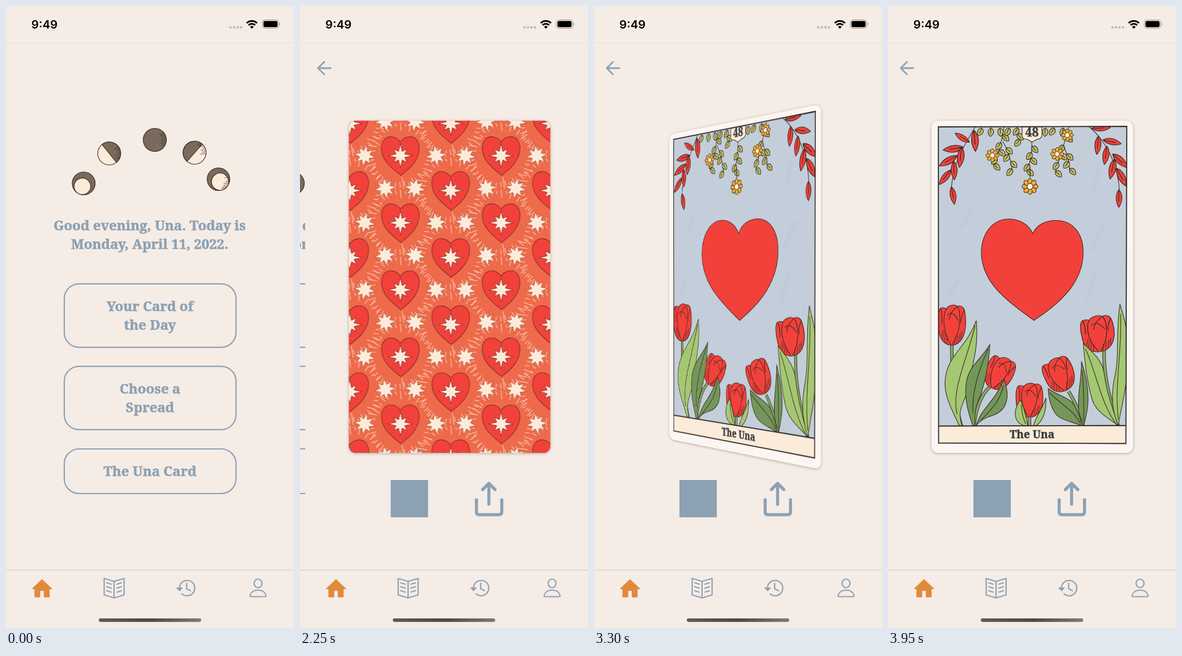
Animation of 509x1101 px, one loop 4000 ms. Source, as an HTML page:

```html
<!DOCTYPE html>
<html lang="en">
<head>
<meta charset="utf-8">
<title>Card of the day</title>
<style>
  html, body { margin: 0; width: 100%; height: 100%; overflow: hidden; background: #f5ece6; }
  #stage { position: relative; width: 509px; height: 1101px; overflow: hidden; background: #f5ece6; }
  .layer { position: absolute; left: 0; top: 0; width: 509px; height: 1101px; }
  #detail { background: #f5ece6; }
  svg { display: block; }
  .face { position: absolute; left: 77px; top: 203px; width: 356px; height: 588px;
    border-radius: 12px; overflow: hidden; box-shadow: 0 1px 5px rgba(60, 40, 30, .35); }
  #back { background: #ee6a4a; }
  #front { background: #fcf6f2; }
  text { text-anchor: middle; font-family: "Noto Serif", serif; font-weight: 700; }
  .copy { font-size: 24px; fill: #8ca1b3; stroke: #8ca1b3; stroke-width: .6; }
  .label { fill: #3b3c3e; stroke: #3b3c3e; stroke-width: .5; }
  .line { fill: none; stroke: #8ca1b3; stroke-width: 2.2; stroke-linecap: round; stroke-linejoin: round; }
  .ink { stroke: #3a2a22; stroke-width: 1.1; stroke-linejoin: round; stroke-linecap: round; }
  .dark { fill: #786b5b; }
  .cream { fill: #fdebda; }
  .red { fill: #f2413b; }
  .lime { fill: #a4c872; }
  .green { fill: #73975a; }
  .none { fill: none; }
</style>
</head>
<body>
<div id="stage">
  <svg id="home" class="layer" viewBox="0 0 509 1101">
    <g class="ink">
      <circle class="dark" cx="137.3" cy="314" r="20.3"/>
      <circle class="cream" cx="135" cy="319.2" r="14.6"/>
      <circle class="cream" cx="182.4" cy="261" r="20.3"/>
      <path class="dark" d="M169.6 245.2A20.3 20.3 0 0 1 195.2 276.8Z"/>
      <circle class="dark" cx="263" cy="237" r="20.5"/>
      <circle class="cream" cx="333.3" cy="259.6" r="20.4"/>
      <path class="dark" d="M347 244.4A20.4 20.4 0 0 0 320 275.2Z"/>
      <circle class="dark" cx="375.5" cy="306.6" r="20"/>
      <circle class="cream" cx="378.4" cy="311" r="15.2"/>
      <path id="hatch" class="none" stroke-width=".8"/>
    </g>
    <g class="copy">
      <text x="254" y="397">Good evening, Una. Today is</text>
      <text x="254" y="430">Monday, April 11, 2022.</text>
      <text x="254.5" y="540">Your Card of</text>
      <text x="254.5" y="573">the Day</text>
      <text x="254.5" y="686">Choose a</text>
      <text x="254.5" y="719">Spread</text>
    </g>
    <g class="line">
      <rect x="103" y="491.8" width="303.5" height="112.4" rx="26"/>
      <rect x="103" y="637.8" width="303.5" height="112" rx="26"/>
    </g>
    <g id="pressed">
      <rect class="line" x="103" y="784" width="303.5" height="79" rx="26"/>
      <text class="copy" x="254.5" y="832">The Una Card</text>
    </g>
  </svg>

  <div id="detail" class="layer">
    <svg class="layer" viewBox="0 0 509 1101">
      <path class="line" style="stroke-width:2.8" d="M45 110H23M33.5 99L22.5 110L33.5 121"/>
      <rect x="151" y="839" width="66" height="66" fill="#8ca1b3"/>
      <path class="line" style="stroke-width:5.4" d="M302.5 874V895.5Q302.5 900.5 307.5 900.5H342Q347.3 900.5 347.3 895.5V874M324.5 882V846M313.5 856L324.5 845L335.5 856"/>
    </svg>
    <div id="back" class="face"><svg width="356" height="588"><defs id="motifs"></defs><g id="pattern"></g></svg></div>
    <div id="front" class="face">
      <svg width="356" height="588" viewBox="77 203 356 588">
        <defs>
          <g id="tulip" class="ink">
            <path class="red" d="M-3 35C-17 34-24 18-24 0C-25-14-24-26-20-30C-16-32-13-31-10-29C-6-36 5-38 10-33C14-36 20-33 22-27C26-12 25 10 19 22C14 32 6 36-3 35Z"/>
            <path class="none" d="M-10-29C-18-12-14 14-3 33M10-33C2-27-4-20-5-10M10-33C17-20 15 12 1 33M-8-18C0-26 6-18 11-8M22-27C18-20 15-12 16-4M-20-30C-16-22-18-12-18-2"/>
            <path class="none" stroke-width=".8" d="M-19 20l4-13M-17 25l4-14M-14 29l3-13M-10 32l2-13M16 24l2-13M12 29l3-15M8 32l3-14M4 34l2-13"/>
          </g>
          <path id="leaf" d="M0 0C8-7 19-7 30 0C20 6 8 6 0 0M0 0L20 0"/>
          <path id="bud" d="M0 0C3-7 10-7 15 0C10 6 3 6 0 0M0 0L10 0"/>
          <g id="flower" class="ink"></g>
          <clipPath id="sky"><rect x="89" y="214" width="332" height="529"/></clipPath>
        </defs>
        <rect x="89" y="214" width="332" height="560" fill="#c3ceda"/>
        <g fill="none" stroke="#b9c5ce" stroke-width="9" stroke-linecap="round" opacity=".4">
          <path d="M109 510L124 485M372 290L364 322M366 475L352 520M380 390L360 430M130 390L145 365"/>
        </g>
        <g clip-path="url(#sky)">
          <g id="vines" class="ink"></g>
          <g class="ink">
            <path class="none" d="M154 214C140 240 116 270 112 322M356 214C386 240 407 280 409 328"/>
            <g id="sprigs" class="red"></g>
          </g>
          <path class="ink red" d="M256 403C248 385 230 377 214 377C184 377 165 404 165 437C166 488 206 520 258 556.5C303 527 345 490 345 436C345 402 326 379 296 379.5C277 380 262 388 256 403Z"/>
          <g fill="none" stroke="#3a2a22" stroke-width="6"><path id="stems" d="M113 598C112 650 118 705 130 744M180 674C162 690 154 720 152 744M250 726V744M319 682C330 700 340 720 343 744M382 610C380 660 398 715 407 744"/></g>
          <use href="#stems" fill="none" stroke="#86aa62" stroke-width="4"/>
          <use href="#tulip" transform="translate(113 565)"/>
          <use href="#tulip" transform="translate(196.5 650) rotate(24) scale(1 .84)"/>
          <g class="ink">
            <path class="lime" d="M126 743C112 712 99 690 101 663C104 618 138 606 156 557C161 608 147 640 142 672C137 705 120 710 131 743Z"/>
            <path class="green" d="M150 743C140 715 134 690 139 663C145 635 165 625 180 599C178 640 170 668 164 688C156 705 152 720 154 743Z"/>
            <path class="green" d="M156 743C164 712 188 702 205 661C214 685 212 705 200 716C188 728 168 725 156 743Z"/>
            <path class="none" d="M122 722C112 680 138 630 154 566M150 720C148 680 162 640 177 607M163 735C180 715 196 705 204 672"/>
          </g>
          <use href="#tulip" transform="translate(250 698) scale(.98 .85)"/>
          <use href="#tulip" transform="translate(303 653) rotate(-22) scale(1.08 .85)"/>
          <use href="#tulip" transform="translate(371 580.5) rotate(-8) scale(1.2 .9)"/>
          <g class="ink">
            <path class="lime" d="M241 743C221 737 221 715 234 697C240 710 244 725 247 743Z"/>
            <path class="lime" d="M257 743C262 725 272 715 279 694C280 715 276 732 262 743Z"/>
            <path class="green" d="M283 677C300 690 324 693 331 710C337 722 341 730 342 743C325 735 305 735 295 720C287 708 284 695 283 677Z"/>
            <path class="green" d="M342 629C352 660 356 690 352 715C350 728 348 735 346 743C343 735 338 725 337 715C334 690 342 665 342 629Z"/>
            <path class="lime" d="M345 597C360 612 378 625 382 650C386 680 395 710 408 743C390 730 370 720 362 700C352 670 348 630 345 597Z"/>
            <path class="lime" d="M410 528C416 550 423 565 422 595V655C419 690 411 715 407 743C396 715 394 690 400 660C410 620 402 580 410 528Z"/>
            <path class="none" d="M286 685C305 705 328 715 339 738M343 645C347 680 346 710 346 735M349 607C367 645 375 700 402 738M411 545C414 610 400 670 407 732M236 706C236 720 239 730 243 739"/>
          </g>
        </g>
        <path class="ink cream" d="M237 214H272V230Q270 236 263 236L254.5 241L246 236Q238 236 237 230Z"/>
        <text class="label" x="254.5" y="231" font-size="21">48</text>
        <rect class="cream" x="89" y="743" width="332" height="31"/>
        <path fill="none" stroke="#2c2421" stroke-width="1.8" d="M89 214L422 213L420.5 774.5L89.5 773.5ZM89 743.5L421 742.5"/>
        <text class="label" x="254.5" y="765.5" font-size="19">The Una</text>
      </svg>
    </div>
  </div>

  <svg class="layer" viewBox="0 0 509 1101">
    <defs><linearGradient id="bar"><stop stop-color="#5f5a58"/><stop offset=".5" stop-color="#4d4846"/><stop offset="1" stop-color="#7f7976"/></linearGradient></defs>
    <path stroke="#ebe2dd" stroke-width="1.3" d="M0 65.5H509"/>
    <path stroke="#dcd4cf" stroke-width="1.5" d="M0 998.5H509"/>
    <text x="68" y="40" style="font:600 20.5px Inter, sans-serif">9:49</text>
    <path stroke="#c9bbb5" stroke-width="4.6" stroke-linecap="round" stroke-dasharray="0 6.2" d="M396.7 37.7H416"/>
    <g fill="none" stroke="#000" stroke-width="3"><path d="M425.3 30.2A13 13 0 0 1 443.7 30.2M428.7 33.9A8.2 8.2 0 0 1 440.3 33.9"/></g>
    <path d="M434.5 40.3L431.2 36.8A4.8 4.8 0 0 1 437.8 36.8Z"/>
    <rect x="453" y="24.5" width="29" height="15" rx="4.8" fill="none" stroke="#a29b97" stroke-width="1.2"/>
    <rect x="455" y="26.5" width="25" height="11" rx="3"/>
    <path fill="#a29b97" d="M483.3 29.5Q486.3 32 483.3 34.7Z"/>

    <path fill="#e08a3b" stroke="#e08a3b" stroke-width="1.5" stroke-linejoin="round" d="M46.8 1031.5L63.5 1015.5L80.7 1031.5H76.3V1046H67.5V1034.5H59.7V1046H51V1031.5Z"/>
    <g class="line">
      <path d="M191 1018.5L173.5 1013.2V1042.5L191 1047.8L208.7 1042.5V1013.2ZV1047.5"/>
      <path d="M178 1021L186 1023.5M178 1028L186 1030.5M178 1035L186 1037.5M204 1021L196 1023.5M204 1028L196 1030.5M204 1035L196 1037.5"/>
      <path d="M306.5 1030A13.6 13.6 0 1 1 311 1040.5M319.3 1021.5V1031.5L326 1035"/>
      <path style="fill:#8ca1b3;stroke-width:1.5" d="M302 1030H311.5L306.7 1035Z"/>
      <ellipse cx="445.5" cy="1022" rx="7" ry="7.5"/>
      <path d="M433 1045.5Q431 1045.5 431.5 1043C433.5 1036.5 439 1034 445.5 1034S457.5 1036.5 459.5 1043Q460 1045.5 458 1045.5Z"/>
    </g>
    <rect x="164" y="1084" width="181" height="6.2" rx="3.1" fill="url(#bar)"/>
  </svg>
</div>

<script>
const $ = id => document.getElementById(id);
const polar = (r, deg) => [r * Math.cos(deg * Math.PI / 180), r * Math.sin(deg * Math.PI / 180)];
const pt = p => p.map(v => v.toFixed(1)).join(' ');
const use = (id, x, y, extra = '') => `<use href="#${id}" transform="translate(${x.toFixed(1)} ${y.toFixed(1)}) ${extra}"/>`;
let seed = 7;
const rnd = () => (seed = seed * 16807 % 2147483647) / 2147483647;

// Short pen strokes on the right rim of the moons
let hatch = '';
for (const [x, y, tilt] of [[182.4, 261, 0], [263, 237, 0], [333.3, 259.6, -20], [375.5, 306.6, 25]])
  for (let a = -35; a <= 25; a += 10) {
    const [dx, dy] = polar(20, a + tilt);
    hatch += `M${pt([x + dx, y + dy])}l${pt([-4 - rnd() * 6, 1])}`;
  }
$('hatch').setAttribute('d', hatch);

// Card back: half-drop repeat of hearts, stars and rays
const star = (long, short, inner) => 'M' + Array.from({ length: 16 }, (_, i) =>
  pt(polar(i % 2 ? inner : i % 4 ? short : long, i * 22.5 - 90))).join('L') + 'Z';
let rays = 'M3 38L6 58';
for (let a = 0; a < 360; a += 9) {
  const from = 44 + rnd() * 9, to = from + 4 + rnd() * 11;
  rays += `M${pt(polar(from, a + rnd() * 3))}L${pt(polar(to, a))}`;
}
$('motifs').innerHTML =
  `<path id="rays" d="${rays}" stroke="#f8c3a6" stroke-width="1.4" stroke-linecap="round"/>
   <path id="spark" class="cream" d="${star(19, 17.5, 9)}" stroke="#a5503a" stroke-width=".7"/>
   <g id="heart" stroke="#7d2f24" stroke-width="1.1" stroke-linejoin="round"><path class="red" d="M0-24C-6-34-20-37-28-29C-36-20-35-2-24 12C-16 22-8 28 1 35C9 28 19 22 26 10C36-6 35-21 28-29C20-37 6-34 0-24Z"/>
   <path class="cream" stroke-width=".9" d="${star(21.5, 16.5, 8.2)}"/></g>`;
const hearts = [];
for (let k = 0; k < 6; k++) {
  for (const x of [91, 269]) hearts.push([x, 62 + 118.7 * k, 0]);
  for (const x of [1.5, 180, 358]) hearts.push([x, 5 + 118.7 * k, -4]);
}
$('pattern').innerHTML =
  hearts.map(([x, y]) => use('rays', x, y)).join('') +
  hearts.map(([x, y, dy]) => use('spark', x - 63, y + dy, 'rotate(10)') + use('spark', x + 63, y + dy, 'rotate(-8)')).join('') +
  hearts.map(([x, y]) => use('heart', x, y)).join('');

// Card front: red sprigs, hanging vines and flowers
const sprigs = [
  [152, 220, 86, 1.25], [144, 241, 212, 1], [133, 250, 172, 1.2], [122, 265, 150, 1.2], [130, 250, 96, 1.2],
  [116, 275, 88, 1.1], [111, 290, 128, 1.1], [112, 320, 80, 1.05],
  [360, 217, -3, 1.1], [372, 230, 95, 1.1], [380, 237, 12, 1.1], [387, 248, 98, 1.1], [397, 262, 42, 1.2],
  [400, 271, 102, 1.2], [404, 287, 62, 1.2], [408, 325, 90, 1.05]
];
$('sprigs').innerHTML = sprigs.map(([x, y, a, s]) => use('leaf', x, y, `rotate(${a}) scale(${s})`)).join('');

$('flower').innerHTML = Array.from({ length: 8 }, (_, i) =>
  `<ellipse cx="9" rx="5" ry="3.9" fill="#f3ae3c" transform="rotate(${i * 45})"/>`).join('') +
  '<circle r="5.2" fill="#fff8ee"/>';
const mix = (a, b, c, u) => (1 - u) ** 2 * a + 2 * u * (1 - u) * b + u * u * c;
const bud = (x, y, a) => use('bud', x, y, `rotate(${a})`);
const vines = [
  [205, 214, 200, 250, 187, 280, 5], [203, 240, 216, 262, 219, 288, 4], [254, 238, 256, 265, 246, 290, 5],
  [320, 214, 308, 255, 296, 292, 5], [311, 250, 320, 268, 321, 288, 3], [228, 214, 226, 228, 233, 236, 2]
];
let green = '';
for (const [x0, y0, x1, y1, x2, y2, n] of vines) {
  green += `<path class="none" d="M${x0} ${y0}Q${x1} ${y1} ${x2} ${y2}"/>`;
  for (let i = 1; i <= n; i++) {
    const u = i / n;
    green += bud(mix(x0, x1, x2, u), mix(y0, y1, y2, u), i % 2 ? 45 : 125);
  }
}
for (let x = 166; x < 312; x += 16) green += bud(x, 216, 70 + rnd() * 60);
green += '<path class="none" d="M251 285V310"/>';
const flowers = [[184.5, 264.5, .82], [251, 319.5, 1], [317, 228.5, .78], [299, 262, .82]];
$('vines').innerHTML = `<g fill="#bfc067">${green}</g>` +
  flowers.map(([x, y, s]) => use('flower', x, y, `scale(${s})`)).join('');

// Motion
const LOOP = 4000, STEP = 50, WIDTH = 509;

function press(t) {
  if (t < 1850) return 1;
  const p = Math.min(1, Math.max(0, (t - 1900) / 220));
  return .2 + .8 * (p < .5 ? 2 * p * p : 1 - 2 * (1 - p) ** 2);
}
function slide(t) {
  if (t < 1950) return 1;
  return t < 2400 ? Math.exp(-12.5 * (t - 1930) / 1000) : 0;
}
// Underdamped spring: stiffness 230.2, damping 19, mass 1
function spring(t) {
  if (t < 3200) return 0;
  const s = (t - 3168) / 1000, decay = 9.5, w = Math.sqrt(230.2 - decay * decay);
  return 1 - Math.exp(-decay * s) * (Math.cos(w * s) + decay / w * Math.sin(w * s));
}
function draw(now) {
  const t = Math.floor(now % LOOP / STEP) * STEP;
  const off = slide(t), turn = spring(t), showBack = turn < .5;
  $('pressed').style.opacity = press(t);
  $('home').style.transform = `translateX(${-.3 * WIDTH * (1 - off)}px)`;
  $('detail').style.transform = `translateX(${WIDTH * off}px)`;
  $('back').style.visibility = showBack ? 'visible' : 'hidden';
  $('front').style.visibility = showBack ? 'hidden' : 'visible';
  const angle = 180 * turn - (showBack ? 0 : 180);
  $(showBack ? 'back' : 'front').style.transform = `perspective(1305px) rotateY(${angle}deg)`;
}
const start = performance.now();
function tick() {
  draw(performance.now() - start);
  requestAnimationFrame(tick);
}
tick();
</script>
</body>
</html>
```
